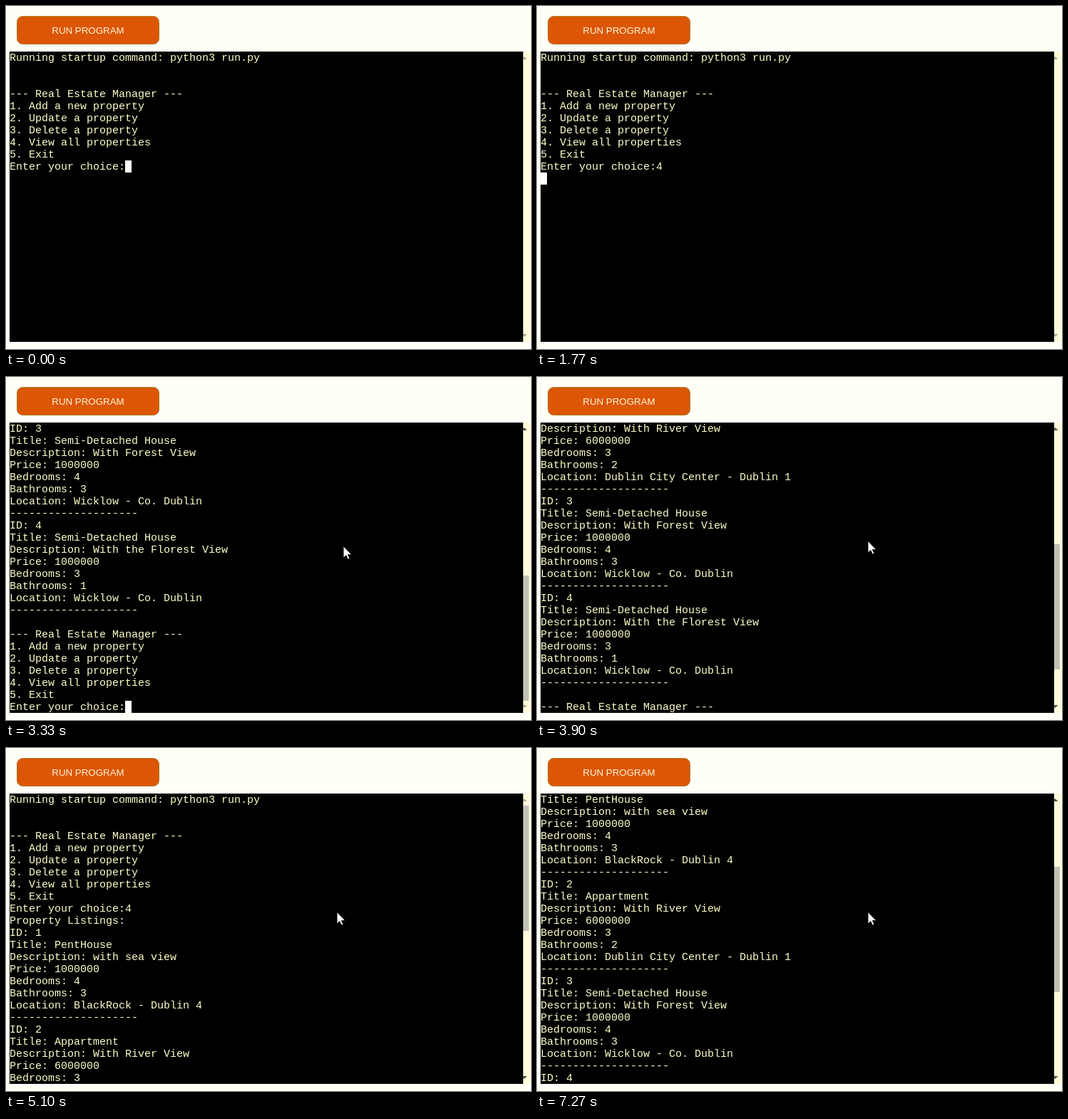
An HTML page for the animation above (8000 ms loop, 736 by 482 pixels).

```html
<!DOCTYPE html>
<html lang="en">
<head>
<meta charset="utf-8">
<title>Terminal demo</title>
<style>
  html, body { margin: 0; width: 100%; height: 100%; overflow: hidden; background: #fffff8; }
  svg { display: block; width: 736px; height: 482px; }
  .term text {
    font: 15px "Liberation Mono", "Courier New", monospace;
    fill: #ffffc8;
    white-space: pre;
  }
  .label { font: 13.333px "Liberation Sans", Arial, sans-serif; fill: #fff6d8; text-anchor: middle; }
</style>
</head>
<body>
<svg viewBox="0 0 736 482">
  <rect width="736" height="482" fill="#fffff8"/>
  <rect x="15.5" y="14.5" width="199" height="39" rx="8" fill="#dc5606" stroke="#a87a1c"/>
  <text class="label" x="115" y="39">RUN PROGRAM</text>
  <rect x="725" y="64" width="10" height="408" fill="#fffbda"/>
  <rect id="thumb" x="725" width="8" height="176" fill="#c2c1b6"/>
  <path id="up" d="M722.5 75 L726.5 71 L730.5 75 Z"/>
  <path id="down" d="M722.5 461 L726.5 465 L730.5 461 Z"/>
  <rect x="5" y="64" width="720" height="408" fill="#000"/>
  <g id="term" class="term"></g>
  <rect id="caret" width="9" height="17" fill="#fffffa"/>
  <path id="mouse" d="M0 0 V16.5 L3.8 13 L6.4 18.6 L8.8 17.5 L6.3 12 H11.5 Z" fill="#fffffa" stroke="#000" stroke-width=".8"/>
</svg>
<script>
const LOOP = 8000, ROWS = 24, ROW_H = 17, CELL_W = 9, LEFT = 5, TOP = 64;
const TRACK_TOP = 81, TRACK_H = 374;
const TYPED = 670, ENTERED = 1770, LISTED = 1900;

const menu = [
  '--- Real Estate Manager ---',
  '1. Add a new property',
  '2. Update a property',
  '3. Delete a property',
  '4. View all properties',
  '5. Exit',
  'Enter your choice:'
];
const homes = [
  ['PentHouse', 'with sea view', 1000000, 4, 3, 'BlackRock - Dublin 4'],
  ['Appartment', 'With River View', 6000000, 3, 2, 'Dublin City Center - Dublin 1'],
  ['Semi-Detached House', 'With Forest View', 1000000, 4, 3, 'Wicklow - Co. Dublin'],
  ['Semi-Detached House', 'With the Florest View', 1000000, 3, 1, 'Wicklow - Co. Dublin']
];
const fields = ['Title', 'Description', 'Price', 'Bedrooms', 'Bathrooms', 'Location'];
const listing = homes.flatMap((home, i) => [
  `ID: ${i + 1}`,
  ...fields.map((name, k) => `${name}: ${home[k]}`),
  '-'.repeat(20)
]);

const prompt = ['Running startup command: python3 run.py', '', '', ...menu];
const typed = [...prompt.slice(0, -1), prompt.at(-1) + '4'];
const entered = [...typed, ''];
const listed = [...typed, 'Property Listings:', ...listing, '', ...menu];
const MAX_SCROLL = (listed.length - ROWS) * ROW_H;

// Wheel notches: start, end, scroll offset reached
const wheel = [
  [3600, 3830, MAX_SCROLL - 100],
  [3915, 4100, MAX_SCROLL - 300],
  [4370, 4570, MAX_SCROLL - 400],
  [4570, 4780, 0],
  [5270, 5500, 100],
  [7030, 7250, 200]
];

const $ = id => document.getElementById(id);
const clamp = x => Math.min(1, Math.max(0, x));
const mix = (a, b, p) => a + (b - a) * p;
const easeInOut = p => p * p * (3 - 2 * p);
const easeOut = p => 1 - (1 - p) ** 2;
const show = (el, on) => el.setAttribute('visibility', on ? 'visible' : 'hidden');

const rows = Array.from({ length: ROWS }, (_, i) => {
  const row = document.createElementNS('http://www.w3.org/2000/svg', 'text');
  row.setAttribute('x', LEFT);
  row.setAttribute('y', TOP + 13 + i * ROW_H);
  $('term').append(row);
  return row;
});

function linesAt(t) {
  if (t < TYPED) return prompt;
  if (t < ENTERED) return typed;
  return t < LISTED ? entered : listed;
}

function scrollAt(t) {
  if (t < LISTED) return 0;
  return wheel.reduce(
    (pos, [start, end, to]) => mix(pos, to, easeInOut(clamp((t - start) / (end - start)))),
    MAX_SCROLL
  );
}

function draw(t) {
  const lines = linesAt(t), scroll = scrollAt(t);
  const first = Math.round(scroll / ROW_H);
  rows.forEach((row, i) => {
    const text = lines[first + i] || '';
    if (row.textContent !== text) row.textContent = text;
  });

  const caretRow = lines.length - 1 - first;
  $('caret').setAttribute('x', LEFT + lines.at(-1).length * CELL_W);
  $('caret').setAttribute('y', TOP + caretRow * ROW_H);
  show($('caret'), caretRow < ROWS);

  const full = t >= LISTED;
  $('thumb').setAttribute('y', Math.floor(TRACK_TOP + scroll * TRACK_H / (listed.length * ROW_H)));
  show($('thumb'), full);
  $('up').setAttribute('fill', full && scroll > 0 ? '#505050' : '#aaa89c');
  $('down').setAttribute('fill', full && scroll < MAX_SCROLL ? '#505050' : '#aaa89c');

  const p = easeOut(clamp((t - 3030) / 370));
  $('mouse').setAttribute('transform', `translate(${mix(723, 464, p)} ${mix(437, 230.5, p)})`);
  show($('mouse'), t >= 3030);
}

const began = performance.now();
function tick() {
  draw((performance.now() - began) % LOOP);
  requestAnimationFrame(tick);
}
tick();
</script>
</body>
</html>
```
